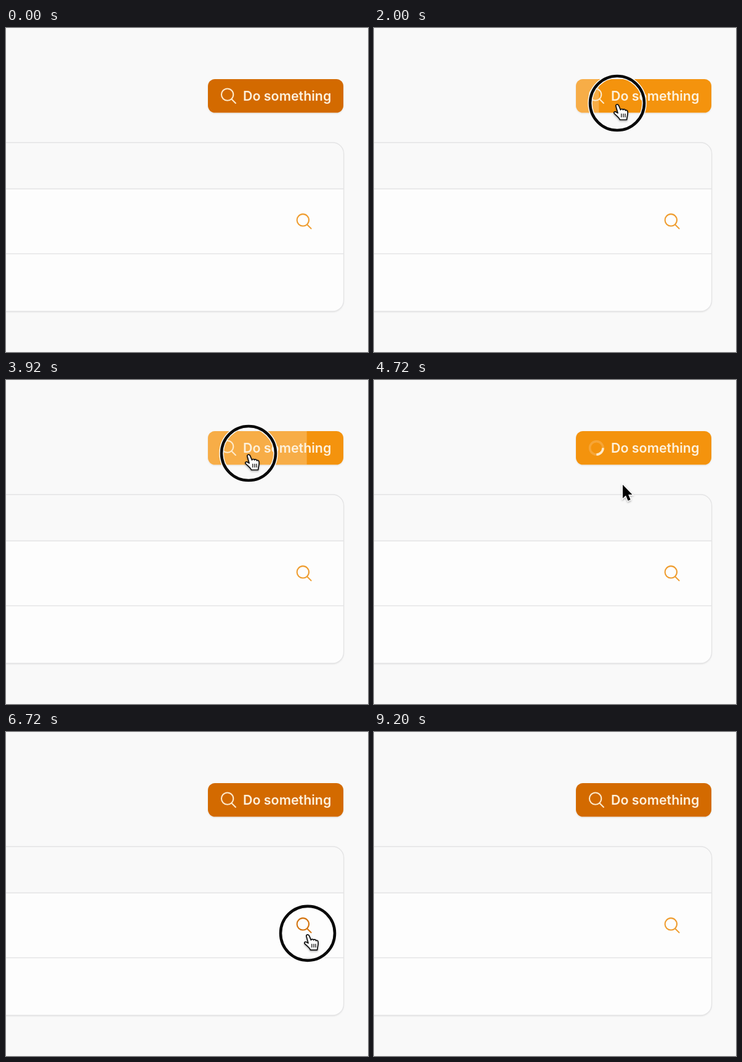
These frames come from a looping animation (588 px wide and 526 px high, 9280 ms). An HTML page:

```html
<!DOCTYPE html>
<html lang="en">
<head>
<meta charset="utf-8">
<title>Hold to confirm</title>
<style>
  html, body { margin: 0; width: 100%; height: 100%; overflow: hidden; background: #f9f9f9; }
  svg { display: block; width: 588px; height: 526px; }
  text { font: 600 21.4px Inter, sans-serif; fill: #fdf1dc; }
</style>
</head>
<body>
<svg viewBox="0 0 588 526">
  <defs>
    <filter id="soft" x="-20%" y="-20%" width="140%" height="150%">
      <feDropShadow dx="0" dy="1.2" stdDeviation="1" flood-opacity=".1"/>
    </filter>
    <filter id="lift" x="-50%" y="-50%" width="200%" height="200%">
      <feDropShadow dx="0" dy="1.5" stdDeviation="1.5" flood-opacity=".35"/>
    </filter>
    <clipPath id="buttonShape"><rect x="328" y="83" width="220" height="54.5" rx="11.5"/></clipPath>
    <path id="search" transform="scale(1.29) translate(-12 -12)" fill="none" stroke-width="1.6" stroke-linecap="round"
      d="M21 21L15.8 15.8A7.5 7.5 0 1 0 5.2 5.2A7.5 7.5 0 0 0 15.8 15.8"/>
    <g id="spinner" fill="none" stroke-width="3.6">
      <circle r="10.7" opacity=".22"/>
      <path d="M-10.7 0A10.7 10.7 0 0 1 0 -10.7"/>
    </g>
  </defs>

  <rect width="588" height="526" fill="#f9f9f9"/>

  <g filter="url(#soft)">
    <rect x="-40" y="186" width="588.5" height="274" rx="18" fill="#fdfdfd"/>
  </g>
  <path d="M-2 261V186H530.5A18 18 0 0 1 548.5 204V261Z" fill="#f9f9f9"/>
  <g fill="none" stroke="#e4e4e5" stroke-width="1.6">
    <rect x="-40" y="186" width="588.5" height="274" rx="18" stroke-width="1.3"/>
    <path d="M0 261.3H548M0 366.5H548"/>
  </g>

  <g filter="url(#soft)"><rect id="button" x="328" y="83" width="220" height="54.5" rx="11.5"/></g>
  <rect id="fill" x="328" y="83" height="55" fill="#fff" opacity=".24" clip-path="url(#buttonShape)"/>
  <g transform="translate(361.3 110.3)" stroke="#fdeacb">
    <use id="buttonIcon" href="#search"/>
    <use id="buttonSpinner" href="#spinner"/>
  </g>
  <text x="385" y="118">Do something</text>

  <g id="row" transform="translate(484 314)">
    <use id="rowIcon" href="#search"/>
    <use id="rowSpinner" href="#spinner"/>
  </g>

  <g id="pointer">
    <g id="ring" fill="none">
      <circle r="44" stroke="#fff" stroke-width="7.4"/>
      <circle r="44" stroke="#0a0a0a" stroke-width="4.6"/>
    </g>
    <g id="arrow" filter="url(#lift)">
      <path d="M0 0V22L5 17.5L8.6 26L12.6 24.3L9.1 16H15.5Z" stroke="#fff" stroke-width="2.4" paint-order="stroke"/>
    </g>
    <g id="hand" filter="url(#lift)" transform="translate(0 2)" stroke="#111" stroke-width="1.7" stroke-linejoin="round" stroke-linecap="round">
      <path fill="#fff" d="M-2 3C-3 0 1 -1 2.5 2L5.5 9C6 7 9 7 9.5 9C10 7.5 13 7.5 13.5 10C14.5 9 17 9.5 17 12.5C17.5 17 16 19 15.5 25H4.5C3 21 -2 18 -5 14.5C-6 12 -3 11 -1 13L1 14Z"/>
      <path fill="none" stroke-width="1.3" d="M6.8 15.5V20.5M10 15.5V20.5M13 15.5V20.5"/>
    </g>
  </g>
</svg>
<script>
const LOOP = 9280, STEP = 80, HOLD = 1000, BUTTON_WIDTH = 220;
const $ = id => document.getElementById(id);
const clamp = v => Math.min(1, Math.max(0, v));
const between = (t, from, to) => t >= from && t < to;
const show = (id, visible) => $(id).setAttribute('display', visible ? 'inline' : 'none');

// Pointer stops: time, x, y
const stops = [
  [400, 160, 520], [1200, 397, 123], [1760, 397, 123], [1920, 395, 122], [2640, 395, 122],
  [3120, 394, 119], [4480, 394, 119], [4720, 404, 170], [5520, 404, 170], [5680, 520, 377],
  [5840, 520, 377], [6240, 490, 327], [8240, 490, 326], [8640, 500, 330]
];

function pointerAt(t) {
  const next = stops.findIndex(s => s[0] > t);
  if (next < 0) return stops.at(-1).slice(1);
  if (next === 0) return stops[0].slice(1);
  const [t0, x0, y0] = stops[next - 1], [t1, x1, y1] = stops[next];
  const p = (t - t0) / (t1 - t0), e = p * p * (3 - 2 * p);
  return [x0 + (x1 - x0) * e, y0 + (y1 - y0) * e];
}

// 0..1 with a short fade at both ends
const hover = (t, from, to) => clamp((t - from) / 160) - clamp((t - to) / 160);
const mix = (a, b, p) => `rgb(${a.map((v, i) => Math.round(v + (b[i] - v) * p))})`;

function holdProgress(t) {
  if (t < 2480) return clamp((t - 1830) / HOLD);
  if (t < 3190) return clamp(.65 - (t - 2480) / 250);
  return t < 4220 ? clamp((t - 3190) / HOLD) : 0;
}

function loading(t, from, to, icon, spinner) {
  const busy = between(t, from, to);
  show(icon, !busy);
  show(spinner, busy);
  $(spinner).setAttribute('transform', `rotate(${(t - from) * .36})`);
}

function draw(t) {
  const [x, y] = pointerAt(t);
  const overButton = x > 328 && x < 548 && y > 83 && y < 138;
  const overRow = Math.abs(x - 484) < 24 && Math.abs(y - 314) < 24;

  $('button').setAttribute('fill', mix([211, 107, 6], [244, 147, 15], hover(t, 960, 4720)));
  $('row').setAttribute('stroke', mix([239, 157, 48], [211, 115, 14], hover(t, 6080, 8720)));
  $('fill').setAttribute('width', BUTTON_WIDTH * holdProgress(t));
  loading(t, 4220, 5480, 'buttonIcon', 'buttonSpinner');
  loading(t, 7458, 8720, 'rowIcon', 'rowSpinner');

  $('pointer').setAttribute('transform', `translate(${x} ${y})`);
  show('pointer', between(t, 400, 8720));
  show('hand', overButton || overRow);
  show('arrow', !overButton && !overRow);
  show('ring', between(t, 1840, 2480) || between(t, 3190, 4240) || between(t, 6400, 7460));
}

function tick() {
  draw(Math.floor(performance.now() % LOOP / STEP) * STEP);
  requestAnimationFrame(tick);
}
tick();
</script>
</body>
</html>
```
